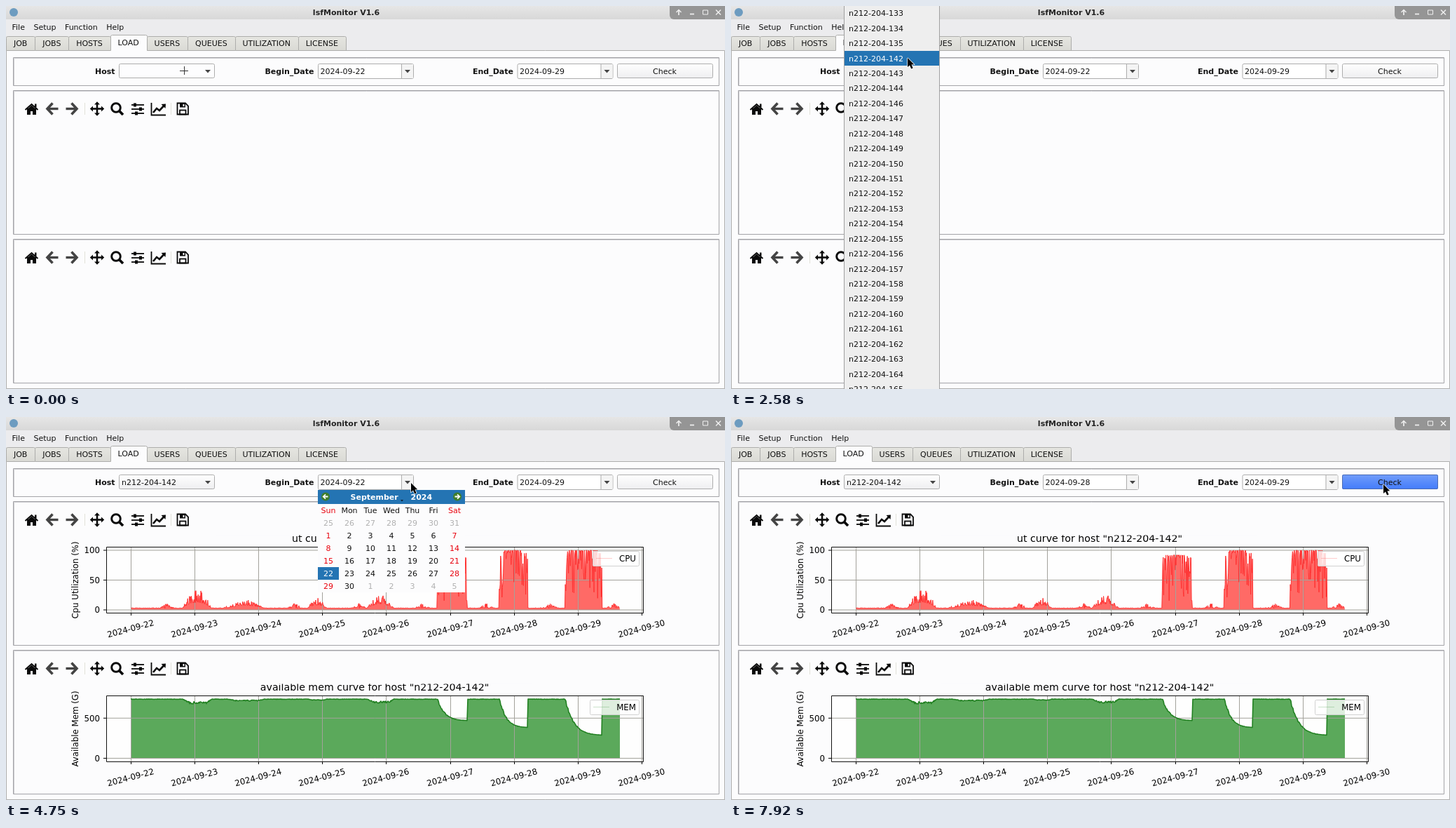
An HTML page with a canvas that plays this animation: 1026x546 px, repeating every 8000 ms.

```html
<!DOCTYPE html>
<html lang="en">
<head>
<meta charset="utf-8">
<title>lsfMonitor</title>
<style>
html, body { margin: 0; width: 100%; height: 100%; overflow: hidden; background: #ececec; }
canvas { display: block; width: 1026px; height: 546px; }
</style>
</head>
<body>
<canvas id="stage" width="1026" height="546"></canvas>
<script>
const ctx = document.getElementById('stage').getContext('2d');
const PAGE = '#fcfcfd', BLUE = '#2474b3', INK = '#111', BLACK = '#0a0a0a';
const LOOP = 8000, TICKS_PER_MS = 0.012;
const LOWER = 212;      // vertical distance between the two chart panels
const ROW = 21.43;      // height of a row in the host list
const HOST = 'n212-204-142';

// ---------- helpers ----------
function rect(x, y, w, h, fill) {
  ctx.fillStyle = fill;
  ctx.fillRect(x, y, w, h);
}
function roundBox(x, y, w, h, fill, radius = 2) {
  ctx.fillStyle = fill;
  ctx.beginPath();
  ctx.roundRect(x, y, w, h, radius);
  ctx.fill();
}
function frame(x, y, w, h, color, radius = 0) {
  ctx.strokeStyle = color;
  ctx.lineWidth = 1;
  ctx.beginPath();
  ctx.roundRect(x + 0.5, y + 0.5, w - 1, h - 1, radius);
  ctx.stroke();
}
function gradient(y0, y1, top, bottom) {
  const g = ctx.createLinearGradient(0, y0, 0, y1);
  g.addColorStop(0, top);
  g.addColorStop(1, bottom);
  return g;
}
function text(s, x, y, { size = 11, bold = false, color = INK, align = 'left' } = {}) {
  ctx.font = `${bold ? 'bold ' : ''}${size}px "DejaVu Sans", sans-serif`;
  ctx.textAlign = align;
  ctx.fillStyle = color;
  ctx.fillText(s, x, y);
  return ctx.measureText(s).width;
}
function turnedText(s, x, y, degrees) {
  ctx.save();
  ctx.translate(x, y);
  ctx.rotate(degrees * Math.PI / 180);
  text(s, 0, 4.3, { size: 11.8, align: 'center', color: '#000' });
  ctx.restore();
}
function trace(points, close) {
  ctx.beginPath();
  points.forEach(([x, y]) => ctx.lineTo(x, y));
  if (close) ctx.closePath();
}
function line(points, color, width = 1) {
  trace(points);
  ctx.strokeStyle = color;
  ctx.lineWidth = width;
  ctx.stroke();
}
function poly(points, color) {
  trace(points, true);
  ctx.fillStyle = color;
  ctx.fill();
}
function dot(x, y, r, color) {
  ctx.beginPath();
  ctx.arc(x, y, r, 0, 7);
  ctx.fillStyle = color;
  ctx.fill();
}
function randomizer(seed) {
  return () => (seed = (seed * 16807) % 2147483647) / 2147483647;
}
const smooth = u => u * u * (3 - 2 * u);

// ---------- window ----------
function titleBar() {
  rect(0, 0, 1026, 19, gradient(0, 19, '#e6e6e6', '#d8d8d8'));
  dot(11, 9, 6, '#6d9cc0');
  text('lsfMonitor V1.6', 485.5, 13, { bold: true, align: 'center', color: '#222' });
  roundBox(947, -6, 90, 25, '#959595', 6);
  const white = '#f0f0f0';
  line([[960, 13], [960, 6]], white, 1.7);
  line([[956.5, 9], [960, 5.5], [963.5, 9]], white, 1.4);
  line([[976, 11.5], [982, 11.5]], white, 1.7);
  frame(994, 5.5, 8, 7, white);
  line([[1013, 5.5], [1020, 12.5]], white, 1.5);
  line([[1020, 5.5], [1013, 12.5]], white, 1.5);
}

function tabs() {
  let x = 0;
  for (const label of ['JOB', 'JOBS', 'HOSTS', 'LOAD', 'USERS', 'QUEUES', 'UTILIZATION', 'LICENSE']) {
    const active = label === 'LOAD', top = active ? 41 : 43;
    ctx.font = '11px "DejaVu Sans", sans-serif';
    const w = ctx.measureText(label).width + 21.8;
    const left = Math.round(x), right = Math.round(x + w);
    roundBox(left, top, right - left, 64 - top, active ? PAGE : gradient(43, 63, '#e6e6e1', '#dadad5'), [2, 2, 0, 0]);
    frame(left, top, right - left + 1, 64 - top, '#adadab', [2, 2, 0, 0]);
    if (active) rect(left + 1, 62, right - left - 1, 3, PAGE);
    text(label, x + w / 2, active ? 56 : 57, { align: 'center' });
    x += w;
  }
}

function panel(y, h) {
  frame(11, y + 1, 1007, h - 1, '#cdcdd1');
  frame(10, y, 1008, h, '#a4a4a8');
}

function windowFrame() {
  rect(0, 0, 1026, 546, '#ececee');
  titleBar();
  let x = 8.5;
  for (const item of ['File', 'Setup', 'Function', 'Help']) x += text(item, x, 34) + 12.5;
  rect(0, 63, 1026, 482, PAGE);
  frame(0, 63, 1026, 483, '#adadad');
  tabs();
  panel(73, 41);
  panel(120, 206);
  panel(120 + LOWER, 206);
}

// ---------- controls ----------
function field(x, h, fill, border = '#adadad') {
  roundBox(x, 82, 137, h, fill);
  frame(x, 82, 137, h, border, 2);
}
function dropMark(x) {
  poly([[x - 4, 91], [x + 4, 91], [x, 95.5]], '#444');
}
function dateEdit(label, x, value) {
  text(label, x - 5.5, 97, { bold: true, align: 'right' });
  field(x, 22, '#fff');
  rect(x + 119, 83, 17, 20, '#f4f4f4');
  rect(x + 119, 83, 1, 20, '#adadad');
  dropMark(x + 128);
  text(value, x + 3.5, 97);
}
function controls(s) {
  const idle = gradient(82, 103, '#fff', '#eeeef0');
  text('Host', 155.5, 97, { bold: true, align: 'right' });
  field(161, 21, s.comboPressed ? '#cbcbc9' : s.loaded ? idle : '#fdfdfe');
  dropMark(288);
  if (s.loaded) text(HOST, 165, 96.5);
  dateEdit('Begin_Date', 445, s.beginDate);
  dateEdit('End_Date', 729.5, '2024-09-29');
  if (s.checkPressed) field(872, 21, gradient(82, 103, '#719dfa', '#437bfa'), '#4a6cb4');
  else field(872, 21, idle);
  text('Check', 940, 96.5, { align: 'center' });
}

// ---------- toolbar ----------
function stepArrow(x, dir) {
  line([[x - 6 * dir, 146.5], [x + 8.5 * dir, 146.5]], '#444', 3.4);
  line([[x + 0.5 * dir, 138.5], [x - 7 * dir, 146.5], [x + 0.5 * dir, 154.5]], '#444', 3.6);
}
function toolbar(dy) {
  ctx.save();
  ctx.translate(0, dy);

  rect(30, 146, 13, 9, BLACK);
  poly([[29.5, 148], [36.5, 141.5], [43.5, 148]], BLACK);
  line([[27.5, 148], [36.5, 140], [45.5, 148]], BLACK, 2);
  rect(41, 139.5, 2.5, 5, BLACK);
  rect(35, 150, 3, 5, PAGE);

  stepArrow(66, 1);
  stepArrow(94, -1);
  for (const x of [112, 235]) rect(x, 138, 1, 17, '#e2e2da');

  for (let i = 0; i < 4; i++) {
    ctx.save();
    ctx.translate(130, 146.5);
    ctx.rotate(i * Math.PI / 2);
    rect(-1.3, -8, 2.6, 8, BLACK);
    poly([[-4, -6], [0, -10.2], [4, -6]], BLACK);
    ctx.restore();
  }

  ctx.strokeStyle = BLACK;
  ctx.lineWidth = 3;
  ctx.beginPath();
  ctx.arc(157, 145, 6.3, 0, 7);
  ctx.stroke();
  line([[161.5, 149.5], [167, 155]], BLACK, 3.8);

  [1, 9, 3].forEach((knob, i) => {
    const y = 141 + i * 6;
    rect(179, y - 0.9, 18, 1.8, BLACK);
    rect(181 + knob, y - 2.5, 4, 5, BLACK);
  });

  line([[207.5, 138], [207.5, 155.5], [228, 155.5]], BLACK, 1.8);
  line([[210, 152], [215, 146], [219, 149], [226, 141.5]], BLACK, 2.6);
  poly([[221.5, 140], [228, 139.5], [227.5, 146]], BLACK);

  trace([[244.5, 138.5], [256, 138.5], [260, 142.5], [260, 154.5], [244.5, 154.5]], true);
  ctx.lineWidth = 1.8;
  ctx.stroke();
  rect(248, 139, 8, 5.5, BLACK);
  rect(252.5, 140, 2, 3, PAGE);
  ctx.strokeRect(248, 148.5, 8.5, 6);
  ctx.restore();
}

// ---------- chart data ----------
const DAY = 91.1, LEFT = 178, RIGHT = 876;
// One job burst a day: start and length in days, peak CPU in percent, drop of the memory curve in pixels.
const BURSTS = [
  [0.81, 0.46, 32, 7], [1.5, 0.6, 14, 3], [2.77, 0.3, 17, 2], [3.7, 0.42, 22, 6],
  [4.8, 0.47, 92, 31], [5.77, 0.45, 100, 41], [6.8, 0.58, 100, 52]
].map(([start, length, peak, drop]) => ({ start, length, peak, drop, heavy: peak > 50 }));

function sample(step, heightAt) {
  const points = [];
  for (let x = LEFT; x <= RIGHT; x += step) {
    const day = (x - LEFT) / DAY;
    const burst = BURSTS.find(b => day >= b.start && day < b.start + b.length);
    points.push([x, heightAt(day, burst, burst && (day - burst.start) / burst.length)]);
  }
  return points;
}

function cpuCurve() {
  const rnd = randomizer(4711);
  return sample(0.65, (day, burst, u) => {
    const noise = rnd();
    const morning = Math.max(0, 1 - Math.abs(day % 1 - 0.57) / 0.12);
    let value = 2.5 + noise + 8 * morning * noise;
    if (burst) {
      const swell = Math.sin(Math.PI * u);
      value = burst.heavy
        ? burst.peak * (1 - 0.85 * noise ** (0.8 + 4 * swell))
        : 3 + burst.peak * swell * (0.3 + 0.7 * noise * noise);
    }
    return 275 - value * 0.85;
  });
}

function memCurve() {
  const rnd = randomizer(99);
  return sample(1, (day, burst, u) => {
    const noise = rnd();
    if (!burst) return 190 + 0.5 * noise;
    if (burst.heavy) return 190 + burst.drop * (1 - Math.exp(-4.5 * u)) - 5 * noise * (1 - u) ** 3;
    return 190 + burst.drop * (0.5 + 0.5 * noise) * Math.min(1, 4 * u, 6 * (1 - u));
  });
}

// ---------- charts ----------
const CPU = { dy: 0, title: 'ut curve', label: 'Cpu Utilization (%)', curve: cpuCurve(), base: 275, weight: 1,
  fill: '#ff6a66', stroke: '#ff3030', ticks: [['100', 190], ['50', 232.5], ['0', 275]], legend: 'CPU', legendX: 837 };
const MEM = { dy: LOWER, title: 'available mem curve', label: 'Available Mem (G)', curve: memCurve(), base: 274.5, weight: 1.6,
  fill: '#5ba95b', stroke: '#228022', ticks: [['500', 217.3], ['0', 274.5]], legend: 'MEM', legendX: 833 };

function chart(c) {
  const grid = '#a3a29b';
  ctx.save();
  ctx.translate(0, c.dy);
  text(`${c.title} for host "${HOST}"`, 526, 178, { size: 14.2, align: 'center', color: '#000' });
  rect(300, 164, 450, 4.5, PAGE);
  rect(143, 185, 767, 94, '#fefefe');
  poly([[LEFT, c.base], ...c.curve, [RIGHT, c.base]], c.fill);
  for (let i = 0; i <= 8; i++) {
    const x = Math.round(LEFT + i * DAY) + 0.5;
    line([[x, 185], [x, 279]], grid);
    line([[x, 279], [x, 283]], '#000');
    turnedText(`2024-09-${22 + i}`, x - 0.8, 301.5, -15);
  }
  for (const [label, y] of c.ticks) {
    line([[143, y], [910, y]], grid);
    line([[139, y], [143, y]], '#000');
    text(label, 134, y + 4.3, { size: 11.8, align: 'right', color: '#000' });
  }
  ctx.lineJoin = 'round';
  line(c.curve, c.stroke, c.weight);
  ctx.lineJoin = 'miter';
  frame(143, 185, 767, 95, '#111');
  turnedText(c.label, 99, 232.5, -90);

  const width = 904 - c.legendX;
  roundBox(c.legendX, 191, width, 22, 'rgba(255,255,255,.8)');
  frame(c.legendX, 191, width, 22, '#d0d0d0', 2);
  ctx.globalAlpha = 0.3;
  line([[c.legendX + 5, 201.5], [c.legendX + 28, 201.5]], c.stroke, 0.8);
  ctx.globalAlpha = 1;
  text(c.legend, 899, 205.5, { size: 11.8, align: 'right', color: '#000' });
  ctx.restore();
}

// ---------- popups ----------
function hostList(cursorY) {
  const gaps = [136, 137, 138, 139, 140, 141, 145];
  const current = Math.floor(cursorY / ROW);
  rect(161, 0, 137, 546, '#eeeeee');
  for (let id = 133, i = 0; id <= 165; id++) {
    if (gaps.includes(id)) continue;
    const on = i === current;
    if (on) rect(162, Math.round(i * ROW), 135, 21, BLUE);
    text(`n212-204-${id}`, 168, i * ROW + 14.3, { color: on ? '#fff' : INK });
    i++;
  }
  for (const x of [161, 297]) rect(x, 0, 1, 546, '#a0a0a0');
}

function monthButton(x, dir) {
  dot(x, 113.5, 6, '#3f7d2c');
  line([[x - 3.5 * dir, 113.5], [x + 3 * dir, 113.5]], '#fff', 2);
  line([[x, 110.3], [x + 3.3 * dir, 113.5], [x, 116.7]], '#fff', 1.7);
}
function calendar(selected) {
  rect(445, 104, 210, 146, PAGE);
  rect(445, 104, 210, 20, BLUE);
  monthButton(456, -1);
  monthButton(644, 1);
  text('September', 491.5, 118, { bold: true, color: '#fff' });
  text('2024', 577.5, 118, { bold: true, color: '#fff' });
  poly([[563, 118], [567, 118], [565, 120.5]], '#123');
  const columnX = col => 460 + col * 30;
  const dayColor = col => col % 6 ? INK : '#e8000c';
  ['Sun', 'Mon', 'Tue', 'Wed', 'Thu', 'Fri', 'Sat'].forEach((day, col) =>
    text(day, columnX(col), 137, { align: 'center', color: dayColor(col) }));
  for (let i = 0; i < 42; i++) {
    const col = i % 7, x = columnX(col), y = 151 + Math.floor(i / 7) * 18;
    const date = new Date(2024, 8, i - 6);
    const inside = date.getMonth() === 8;
    const on = inside && date.getDate() === selected;
    if (on) rect(x - 15, y - 9, 30, 18, BLUE);
    text(date.getDate(), x, y + 4, { align: 'center', color: on ? '#fff' : inside ? dayColor(col) : '#b0b0b0' });
  }
}

// ---------- pointer ----------
// Eased moves: first tick, last tick, end point. The pointer rests in between.
const MOVES = [
  [19, 27, 252, 53], [28, 31, 252, 74], [38, 40, 298, 98], [41, 47, 985, 212], [47, 51, 578, 94],
  [61, 66, 540, 165], [66, 70, 577, 224], [71, 73, 607, 223], [74, 77, 638, 222], [82, 92, 931, 96]
];
function pointerAt(tick) {
  let x = 254, y = 91;
  for (const [from, to, endX, endY] of MOVES) {
    const u = smooth(Math.min(1, Math.max(0, (tick - from) / (to - from))));
    x += (endX - x) * u;
    y += (endY - y) * u;
  }
  return [Math.round(x), Math.round(y)];
}
function pointer(x, y) {
  const shape = [[0, 0], [0, 13], [3, 10.4], [5.2, 15.6], [7.6, 14.5], [5.5, 9.5], [9.2, 9.2]].map(([a, b]) => [x + a, y + b]);
  line([...shape, shape[0]], '#fff', 1.4);
  poly(shape, '#000');
}
function crosshair() {
  rect(248, 92, 12, 1, '#333');
  rect(254, 86, 1, 12, '#333');
}

// ---------- playback ----------
function draw(tick) {
  const during = (a, b) => tick >= a && tick < b;
  const [x, y] = pointerAt(tick);
  const loaded = tick >= 39;
  windowFrame();
  controls({
    loaded,
    comboPressed: during(35, 39),
    beginDate: tick < 83 ? '2024-09-22' : '2024-09-28',
    checkPressed: tick >= 94
  });
  toolbar(0);
  toolbar(LOWER);
  if (loaded) [CPU, MEM].forEach(chart);
  if (during(8, 35)) hostList(y);
  if (during(57, 83)) calendar(tick < 81 ? 22 : 28);
  if (tick < 6) crosshair();
  else pointer(x, y);
}

let shown = -1;
function play(now) {
  const tick = Math.min(95, Math.floor((now % LOOP + 3.4) * TICKS_PER_MS));
  if (tick !== shown) draw(shown = tick);
  requestAnimationFrame(play);
}
play(performance.now());
</script>
</body>
</html>
```
